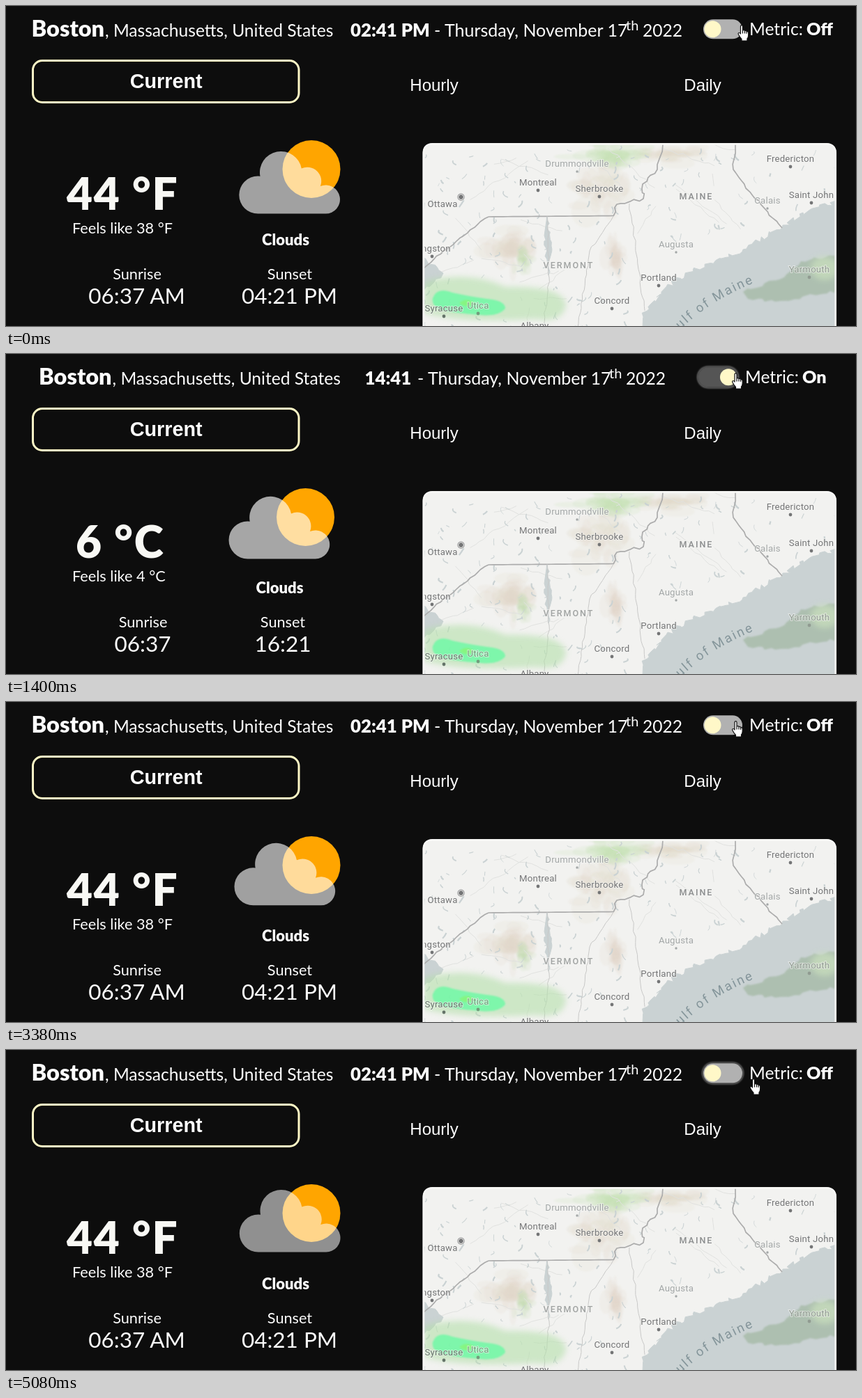
An HTML page for the animation above (5230 ms loop, 1219 px wide and 460 px high).

```html
<!DOCTYPE html>
<html lang="en">
<head>
<meta charset="utf-8">
<title>Weather</title>
<style>
html, body { margin: 0; width: 100%; height: 100%; overflow: hidden; background: #0d0d0d; }
svg { display: block; }
text { fill: #fdfdfd; font-family: Lato, sans-serif; white-space: pre; }
.black { font-weight: 900; }
.tab { font-family: "Liberation Sans", Arial, sans-serif; text-anchor: middle; }
.temp { font-size: 64px; letter-spacing: 1.7px; fill: #f8f8f4; }
.small { font-size: 21.7px; }
.clock { font-size: 31.5px; }
.head { font-size: 24.6px; }
.mid { text-anchor: middle; }
#map text { font-family: Roboto, sans-serif; font-size: 13.2px; letter-spacing: .2px; text-anchor: middle;
  stroke: #f4f4f2; stroke-width: 2px; stroke-opacity: .6; paint-order: stroke; }
#map .state { font-size: 12.5px; font-weight: 500; letter-spacing: 2px; }
#map .sea { font-size: 18.5px; letter-spacing: 2.4px; fill: #84959a; stroke: none; text-anchor: start; }
</style>
</head>
<body>
<svg width="1219" height="460" viewBox="0 0 1219 460">
  <defs>
    <clipPath id="mapClip"><rect x="600" y="199" width="589" height="290" rx="12"/></clipPath>
    <filter id="soft" x="-50%" y="-50%" width="200%" height="200%"><feGaussianBlur stdDeviation="4"/></filter>
    <filter id="fine" x="-50%" y="-50%" width="200%" height="200%"><feGaussianBlur stdDeviation="1.2"/></filter>
    <filter id="glow" x="-20%" y="-30%" width="140%" height="160%"><feGaussianBlur stdDeviation=".8"/></filter>
    <path id="seaLine" d="M957 476Q1002 424 1090 391"/>
  </defs>

  <rect x="38.5" y="78.5" width="381.500" height="60" rx="13.500" fill="none" stroke="#fef8c6" stroke-width="3"/>
  <text class="tab" x="229.700" y="118" font-size="28.8" font-weight="700">Current</text>
  <text class="tab" x="614" y="122" font-size="24">Hourly</text>
  <text class="tab" x="999" y="122" font-size="24">Daily</text>

  <g id="place">
    <text class="black" x="36.500" y="44" font-size="32.500">Boston</text>
    <text class="head" x="142" y="44">, Massachusetts, United States</text>
  </g>
  <g id="date">
    <text x="614" y="44" font-size="25">- Thursday, November 17</text>
    <text x="889" y="35" font-size="20">th</text>
    <text class="head" x="913" y="44">2022</text>
  </g>

  <g id="imperial">
    <text class="black" x="494" y="44" font-size="25.800">02:41 PM</text>
    <text class="head" x="1066" y="42">Metric:</text>
    <text class="black" x="1148" y="42" font-size="25.200">Off</text>
    <text class="black temp" x="87" y="293">44 °F</text>
    <text class="small" x="95" y="327">Feels like 38 °F</text>
    <text class="clock mid" x="187.500" y="428">06:37 AM</text>
    <text class="clock mid" x="406.500" y="428">04:21 PM</text>
    <text class="small mid" x="188" y="393">Sunrise</text>
  </g>
  <g id="metric">
    <text class="black" x="514.500" y="44" font-size="25.800">14:41</text>
    <text class="head" x="1060" y="42">Metric:</text>
    <text class="black" x="1142" y="42" font-size="25.200">On</text>
    <text class="black temp" x="100" y="293">6 °C</text>
    <text class="small" x="95" y="327">Feels like 4 °C</text>
    <text class="clock mid" x="196" y="428">06:37</text>
    <text class="clock mid" x="397" y="428">16:21</text>
    <text class="small mid" x="196.500" y="393">Sunrise</text>
  </g>

  <g id="sky">
    <circle cx="438" cy="234.500" r="41.500" fill="#ffa500"/>
    <path id="cloud" fill="#fff" d="M27 0A27 27 0 0 1 27-54Q29-54 30.200-53.800A30 30 0 1 1 89.500-65A20 20 0 0 1 116.500-39.500A20.500 20.500 0 1 1 124 0Z"/>
    <text class="black mid" x="401" y="344" font-size="22">Clouds</text>
  </g>
  <text id="sunset" class="small mid" x="407" y="393">Sunset</text>

  <g id="toggle">
    <rect id="ring" x="-1" y="-1" width="58" height="30" rx="15" fill="none" stroke="#fff" stroke-width="1.800" filter="url(#glow)"/>
    <rect id="track" width="56" height="28" rx="14"/>
    <circle id="knob" cy="14" r="12" fill="#fff8c8"/>
  </g>

  <g id="map">
    <rect x="597.500" y="197" width="593.500" height="300" rx="14" fill="#f5f5f3"/>
    <g clip-path="url(#mapClip)">
      <rect x="598" y="197" width="595" height="300" fill="#f2f2f0"/>
      <g id="hills" filter="url(#fine)"></g>
      <g id="roads" fill="none" stroke="#e0e1df"></g>
      <g id="water" fill="#cad2d3" stroke="#cad2d3"></g>
      <g id="borders" fill="none" stroke="#acacac" stroke-width="1.700" stroke-linejoin="round"></g>
      <g id="rain">
        <path fill="#b4dfaa" opacity=".6" filter="url(#soft)" d="M600 396Q665 380 716 404Q800 402 803 430Q798 456 760 450Q640 456 598 440Z"/>
        <path fill="#6ff8a6" opacity=".85" filter="url(#fine)" d="M612 420Q618 403 640 412Q662 417 690 421Q716 423 716 435Q706 447 680 444Q640 441 622 436Q610 430 612 420Z"/>
        <path fill="#8cf568" opacity=".6" filter="url(#fine)" d="M650 427Q660 418 672 427Q662 436 650 427Z"/>
      </g>
      <g id="labels"></g>
      <text class="sea"><textPath href="#seaLine">Gulf of Maine</textPath></text>
    </g>
    <path d="M599 470V211Q599 198.500 612 198.500H1176Q1189.500 198.500 1189.500 211V470" fill="none" stroke="#f7f7f5" stroke-width="2.500"/>
  </g>

  <path id="hand" fill="#fff" stroke="#111" stroke-width="1.200" stroke-linejoin="round"
    d="M4 13V2.500Q4 .7 5.500 .7T7 2.500V8Q9.500 6.800 10 8.800Q12.200 7.800 12.600 9.800Q15.200 9.200 15.200 11.500V15Q15.200 18 13.500 20V23H5.500V20.500Q3 18 .8 13.500Q.3 11.500 2 11.500Q3 11.500 4 13ZM7 8V12.500M10 9V12.500M12.600 10V12.800"/>
</svg>
<script>
const $ = id => document.getElementById(id);
const add = (parent, tag, attrs, content = '') => {
  const node = document.createElementNS('http://www.w3.org/2000/svg', tag);
  for (const key in attrs) node.setAttribute(key, attrs[key]);
  node.textContent = content;
  $(parent).append(node);
};

let seed = 41;
const random = () => (seed = seed * 16807 % 2147483647) / 2147483647;
const jitter = size => (random() - .5) * 2 * size;

// Breaks straight runs into short uneven ones, for coasts and borders.
function rough(points, size, step = 7) {
  let d = 'M' + points[0];
  points.slice(1).forEach(([x, y], i) => {
    const [fromX, fromY] = points[i];
    const count = Math.ceil(Math.hypot(x - fromX, y - fromY) / step);
    for (let k = 1; k < count; k++) {
      const f = k / count;
      d += `L${fromX + (x - fromX) * f + jitter(size)} ${fromY + (y - fromY) * f + jitter(size)}`;
    }
    d += `L${x} ${y}`;
  });
  return d;
}

// Scatters faint flecks around a point, densest in the middle.
function cluster(fill, x, y, width, height) {
  for (let i = 0; i < 30; i++) add('hills', 'ellipse', {
    fill, opacity: .16,
    cx: x + jitter(width) * random(), cy: y + jitter(height) * random(),
    rx: width * (.12 + random() * .4), ry: height * (.12 + random() * .4)
  });
}

const DARK = '#747576', PALE = '#a3a7a7';
function label(name, x, y, fill, kind = '') {
  add('labels', 'text', { x, y, class: kind, style: `fill:${fill}` }, name);
}
function town(name, x, y, fill = DARK) {
  label(name, x, y, fill);
  add('labels', 'circle', { cx: x, cy: y + 7, r: fill === PALE ? 1.7 : 2.4, fill });
}

function drawMap() {
  const tan = '#dfd6c8', green = '#bfdcae';
  cluster(tan, 850, 262, 46, 44);
  cluster(tan, 722, 350, 42, 32);
  cluster(tan, 955, 212, 55, 18);
  cluster(tan, 875, 360, 18, 36);
  cluster(green, 870, 214, 64, 20);
  cluster(green, 742, 366, 16, 20);

  for (let i = 0; i < 22; i++) {
    const x = 600 + random() * 450, y = 200 + random() * 240;
    add('roads', 'path', { d: rough([[x, y], [x + jitter(90), y + jitter(70)]], 2, 9) });
  }

  const coast = [[1195, 281], [1143, 297], [1113, 319], [1057, 350], [1026, 363], [995, 379], [949, 400], [925, 428], [906, 464]];
  add('water', 'path', { d: rough(coast, 4.5, 5) + 'L1195 464Z' });
  add('water', 'path', { d: rough([[598, 362], [627, 384], [598, 410]], 3) + 'Z' });
  add('water', 'path', { d: rough([[776, 302], [782, 345], [778, 387], [772, 330]], 2, 5) + 'Z' });
  for (let i = 0; i < 220; i++) {
    const x = 600 + random() * 590, y = 200 + random() * 260, length = 2 + random() * 8;
    if (x > 900 && y > 640 - x * .31) continue;
    add('water', 'path', {
      d: `M${x} ${y}q${jitter(4)} ${length * .6} ${jitter(7)} ${length}`,
      fill: 'none', 'stroke-width': .7 + random() * 1.7
    });
  }

  const border = (points, size = 1.6, style = {}) => add('borders', 'path', { d: rough(points, size), ...style });
  border([[598, 378], [645, 339], [692, 303]]);
  border([[692, 303], [871, 301.5]], 0);
  border([[871, 302], [876, 285], [914, 277], [913, 256], [934, 235], [942, 198]], 2.2);
  border([[1046, 197], [1043, 235], [1061, 262], [1113, 319]]);
  const thin = { stroke: '#c8c8c7', 'stroke-width': 1 };
  border([[776, 302], [779, 390], [771, 462]], 1.5, thin);
  border([[871, 302], [837, 352], [820, 462]], 1.5, thin);
  border([[894, 284], [916, 438]], 1.5, thin);

  add('rain', 'path', {
    d: rough([[1057, 411], [1116, 390], [1140, 367], [1195, 358], [1195, 409], [1110, 424], [1064, 421]], 2.5) + 'Z',
    fill: '#a4b9a5', opacity: .75, filter: 'url(#fine)'
  });
  add('rain', 'ellipse', { cx: 1174, cy: 377, rx: 20, ry: 17, fill: '#c9dfbd', opacity: .75, filter: 'url(#soft)' });

  town('Drummondville', 819, 231, PALE);
  town('Montreal', 763, 258);
  town('Sherbrooke', 851, 267);
  town('Fredericton', 1125, 224);
  town('Saint John', 1155, 276);
  town('Calais', 1092, 284, PALE);
  town('Augusta', 961, 347, PALE);
  town('Portland', 936, 395);
  town('Concord', 869, 428);
  town('Kingston', 611, 353);
  town('Syracuse', 628, 439, '#657469');
  town('Utica', 677, 435, '#739c7c');
  town('Yarmouth', 1152, 383, '#909b91');
  town('Albany', 758, 464);
  label('Ottawa', 626, 289, DARK);
  label('◉', 652.5, 278, DARK);
  label('MAINE', 990, 278, '#8b8d8e', 'state');
  label('VERMONT', 807, 377, '#a0a3a2', 'state');
}

const LOOP = 5230, PRESS = 120;
const switches = [1160, 2150, 3520, 4830];
const clamp = value => Math.max(0, Math.min(1, value));
const move = (id, x, y = 0) => $(id).setAttribute('transform', `translate(${x} ${y})`);
const show = (id, on) => { $(id).style.visibility = on ? 'visible' : 'hidden'; };

function render(t) {
  const on = switches.filter(time => time <= t).length % 2 === 1;
  show('metric', on);
  show('imperial', !on);
  move('place', on ? 10.5 : 0);
  move('date', on ? -24 : 0);
  move('sky', on ? -8.5 : 0);
  move('sunset', on ? -10 : 0);

  // The cloud swings left and back while it slowly rises.
  const u = (t - 2500) / 2580;
  move('cloud', 326.5 + 8.3 * u * u, 293 - 2.3 * u + 1.7 * u * u - 1.9 * u ** 3);
  $('cloud').style.opacity = .63 - .09 * ((t - 1600) / 3500) ** 2;

  move('toggle', on ? 993 : 1000, 19.3);
  $('track').setAttribute('fill', on ? '#555' : '#b1b1b1');
  $('knob').setAttribute('cx', on ? 43 : 13.5);
  const age = t - switches.map(time => time - PRESS).filter(time => time <= t).pop();
  $('ring').style.opacity = age >= 0 ? clamp(age / PRESS) * clamp((600 - age) / 350) * .75 : 0;

  const leave = clamp((t - switches[3]) / 250);
  move('hand', 1041 + 8.5 * clamp(1 - t / 250) + 25.5 * leave, 27 + 14 * leave * leave);
}

drawMap();
const start = performance.now();
function frame() {
  render((performance.now() - start) % LOOP);
  requestAnimationFrame(frame);
}
frame();
</script>
</body>
</html>
```
